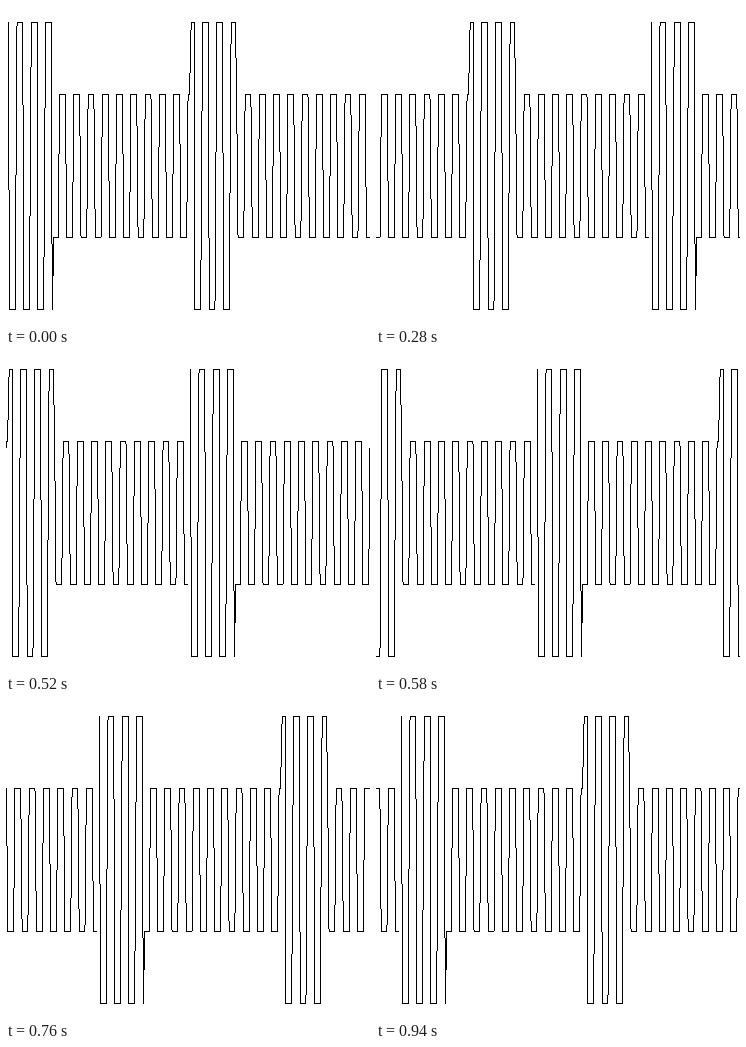
These frames come from a looping animation (364x319 px, 1 s). An HTML page with a canvas:

```html
<!DOCTYPE html>
<html lang="en">
<head>
<meta charset="utf-8">
<title>Square wave</title>
<style>
html, body { margin: 0; width: 100%; height: 100%; overflow: hidden; background: #fff; }
canvas { display: block; }
</style>
</head>
<body>
<canvas id="stage" width="364" height="319"></canvas>
<script>
const W = 364, H = 319, SAMPLES = 254;
const STEP = W / 255, LEFT = 2.21, LEAN = 0.25;
const ctx = document.getElementById('stage').getContext('2d');

// One hard-edged pixel line from a to b
function line(g, a, b) {
  if (a.y === b.y) {
    const x = Math.floor(a.x);
    g.fillRect(x, a.y, Math.floor(b.x) - x + 1, 1);
    return;
  }
  const n = Math.abs(b.y - a.y), dir = Math.sign(b.y - a.y);
  for (let i = 0; i <= n; i++) {
    g.fillRect(Math.floor(a.x + (b.x - a.x) * i / n), a.y + dir * i, 1, 1);
  }
}

// Ten samples per cycle; each half of the strip opens with a loud, slightly leaning burst
function sample(n) {
  const loud = n % 128 < 32;
  const high = (n + 4) % 10 < 5;
  const lean = loud ? (high ? LEAN : -LEAN) : 0;
  const y = high ? (loud ? 16 : 88) : (loud ? 303 : 231);
  return { x: LEFT + lean + n * STEP, y };
}

function makeStrip() {
  const c = document.createElement('canvas');
  c.width = W;
  c.height = H;
  const g = c.getContext('2d');
  g.fillStyle = '#fff';
  g.fillRect(0, 0, W, H);
  g.fillStyle = '#000';
  for (let n = 1; n < SAMPLES; n++) line(g, sample(n - 1), sample(n));
  return c;
}

function roundEven(v) {
  const f = Math.floor(v);
  return v - f === 0.5 ? f + f % 2 : Math.round(v);
}

const strip = makeStrip();

function draw(now) {
  const t = now % 1000;
  const step = t < 100 ? 0 : 1 + Math.floor((t - 100) / 60);
  const shift = roundEven(step * W / 16);
  ctx.drawImage(strip, -shift, 0);
  ctx.drawImage(strip, W - shift, 0);
}

let start = null;
function tick(now) {
  if (start === null) start = now;
  draw(now - start);
  requestAnimationFrame(tick);
}
draw(0);
requestAnimationFrame(tick);
</script>
</body>
</html>
```
